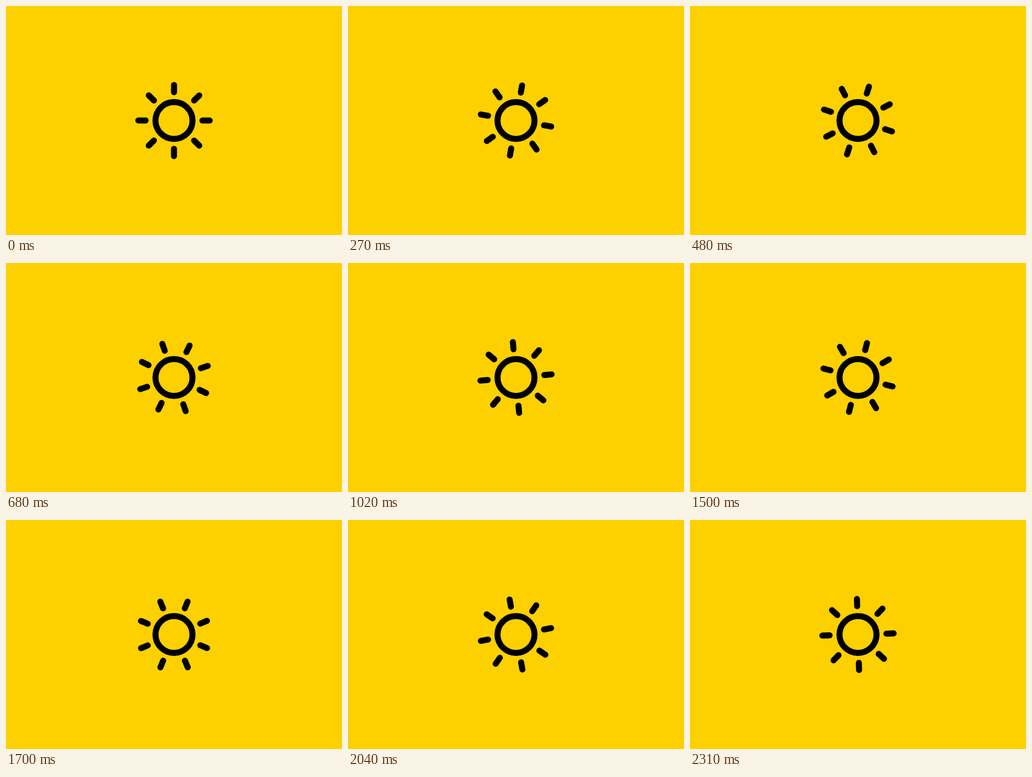
Recreate the animation shown at these times as an HTML page. Size 608x416 px, loop 2.37 s.

```html
<!DOCTYPE html>
<html lang="en">
<head>
<meta charset="utf-8">
<title>Turning sun</title>
<style>
  html, body { margin: 0; width: 100%; height: 100%; overflow: hidden; background: #fdd000; }
  svg { display: block; width: 100%; height: 100%; }
</style>
</head>
<body>
<svg viewBox="0 0 608 416" fill="none" stroke="#000" stroke-width="10.9">
  <g transform="translate(304 208)">
    <circle r="33.5"/>
    <g id="rays" stroke-linecap="round"></g>
  </g>
</svg>
<script>
  const LOOP = 2370;
  const RAY_COUNT = 8;
  const rays = document.getElementById('rays');

  rays.innerHTML = Array.from({ length: RAY_COUNT }, (_, i) =>
    `<path d="M0-51.4V-64.6" transform="rotate(${i * 360 / RAY_COUNT})"/>`).join('');

  // A quarter turn per loop, slightly slower at both ends.
  const angleAt = u => 90 * u + u * (1 - u) * (31 * u - 8.5);

  function draw() {
    const u = performance.now() % LOOP / LOOP;
    rays.setAttribute('transform', `rotate(${angleAt(u)})`);
    requestAnimationFrame(draw);
  }
  draw();
</script>
</body>
</html>
```
